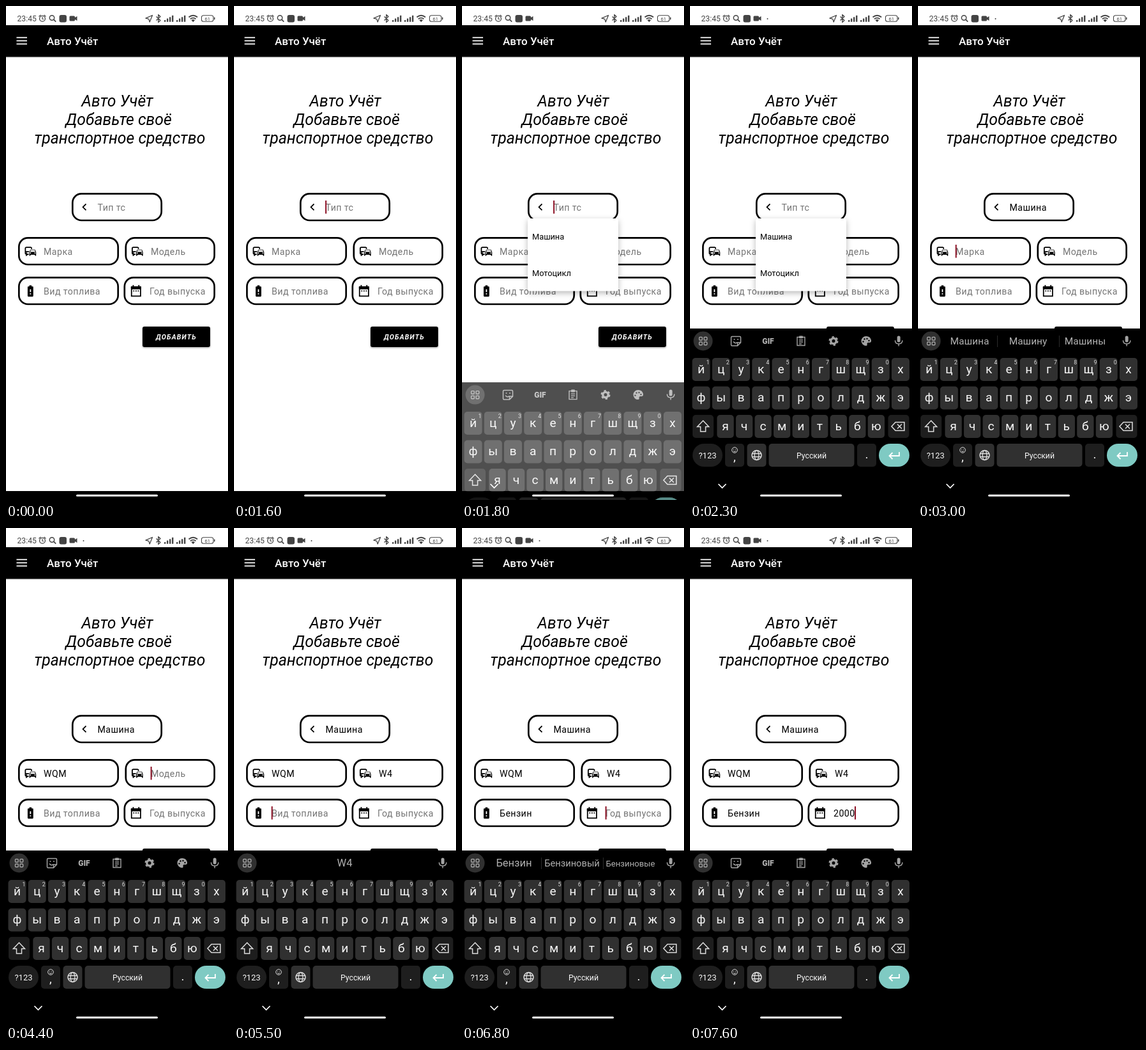
An HTML page for the animation above (8 s loop, 348x772 px).

```html
<!DOCTYPE html>
<html lang="ru">
<head>
<meta charset="utf-8">
<title>Авто Учёт</title>
<style>
html, body { margin: 0; width: 100%; height: 100%; overflow: hidden; background: #fff; }
svg { display: block; width: 348px; height: 772px; font-family: Roboto, sans-serif; }
.line { fill: none; stroke: currentColor; stroke-width: 2; }
.title { font-style: italic; font-size: 24.8px; text-anchor: middle; }
.field { fill: #fff; stroke: #000; stroke-width: 2.7; }
.value, .hint { font-size: 14.2px; letter-spacing: .44px; }
.hint { fill: #757575; }
.popup rect { fill: #fff; filter: drop-shadow(0 3px 5px rgba(0,0,0,.28)); }
.popup text { font-size: 12.8px; }
.cursor { fill: #8c1024; }
.key { fill: #303030; }
.dark { fill: #1e1e1e; }
.letter { font-size: 19.2px; fill: #f6f6f6; text-anchor: middle; }
.digit { font-size: 8.8px; fill: #ddd; text-anchor: middle; }
.tools { color: #a3a3a3; }
.tools text { fill: #b0b0b0; text-anchor: middle; }
</style>
</head>
<body>
<svg id="stage" viewBox="0 0 348 772"></svg>
<script>
const LOOP = 8000, STEP = 100;

const rect = (x, y, w, h, r, attrs = '') =>
  `<rect x="${x}" y="${y}" width="${w}" height="${h}" rx="${r}" ${attrs}/>`;
const text = (x, y, s, attrs = '') => `<text x="${x}" y="${y}" ${attrs}>${s}</text>`;
const line = (d, attrs = '') => `<path class="line" d="${d}" ${attrs}/>`;
const circle = (x, y, r, attrs = '') => `<circle cx="${x}" cy="${y}" r="${r}" ${attrs}/>`;
const icon = (x, y, body) => `<g transform="translate(${x - 10.6} ${y - 10.6}) scale(.886)">${body}</g>`;
// Shown only inside the given "from-to" spans (ms).
const during = (spans, body) => `<g data-on="${spans}">${body}</g>`;

const icons = {
  back: line('M15.5 6.5L10 12l5.5 5.5', 'stroke-width="2.2"'),
  car: line('M14 8V7a2 2 0 0 0-2-2H5a2 2 0 0 0-2 2v8a2 2 0 0 0 2 2h4M3 12.5h6.5M4 20l2.8-2.6') + circle(5, 15, 1.1) +
    '<path fill-rule="evenodd" d="M10 13.8l1.4-4.1q.3-.7 1-.7h7.2q.7 0 1 .7l1.4 4.1v5.5q0 .7-.7.7h-.6q-.7 0-.7-.8V18h-8v1.2q0 .8-.7.8h-.6q-.7 0-.7-.7zM12.4 10l-1 3h9.2l-1-3z"/>' +
    circle(12, 15, 1, 'fill="#fff"') + circle(20, 15, 1, 'fill="#fff"'),
  fuel: rect(7, 4, 10, 18, 1.3) + rect(10, 2, 4, 3, 0) +
    rect(11, 9, 2, 5, 0, 'fill="#fff"') + rect(11, 16, 2, 2, 0, 'fill="#fff"'),
  year: line('M4 5h16v16H4z') + rect(3, 4, 18, 5, 1) + rect(6, 1.5, 2, 4, 0) + rect(16, 1.5, 2, 4, 0) +
    [7, 11, 15].map(x => rect(x, 11, 2, 2, 0)).join('')
};

const fields = [
  { x: 103, y: 293, w: 142, tx: 143.5, icon: 'back', hint: 'Тип тс', value: 'Машина', end: 203, at: 2600, cursor: ['1600-2100', '2600-3000'],
    popup: { y: 332, from: 1600, to: 2500, items: ['Машина', 'Мотоцикл'] } },
  { x: 19, y: 362, w: 158, tx: 59, icon: 'car', hint: 'Марка', value: 'WQM', end: 95, at: 3900, cursor: ['3000-3400', '3900-4400'],
    popup: { y: 73, from: 3000, to: 3800, items: ['WQM', 'NERUMA', 'VELDU', 'ORVE', 'MEZU'] } },
  { x: 186.5, y: 362, w: 141.5, tx: 227, icon: 'car', hint: 'Модель', value: 'W4', end: 249, at: 5100, cursor: ['4400-4800', '5100-5500'],
    popup: { y: 242, from: 4400, to: 5000, items: ['W4', 'W7'] } },
  { x: 19, y: 424, w: 158, tx: 59, icon: 'fuel', hint: 'Вид топлива', value: 'Бензин', end: 111, at: 6300, cursor: ['5500-6000', '6300-6800'],
    popup: { y: 134, from: 5500, to: 6200, items: ['Бензин', 'Дизель', 'Газ', 'Электро', 'Гибрид'] } },
  { x: 184.5, y: 424, w: 143.5, tx: 225, icon: 'year', hint: 'Год выпуска', value: '2000', end: 259, at: 7500, cursor: ['6800-7200', '7500-8000'],
    popup: { y: 247, from: 6800, to: 7400, items: ['2000', '2001', '2002'] } }
];

function drawField(f) {
  const mid = f.y + 21.3;
  const cursor = (x, spans) => during(spans, rect(x, mid - 10.3, 2, 20.5, 0, 'class="cursor"'));
  return rect(f.x + 1.3, f.y + .4, f.w - 2.6, 41.6, 14, 'class="field"') +
    icon(f.x + 19.3, mid, icons[f.icon]) +
    during(`0-${f.at}`, text(f.tx, mid + 5.5, f.hint, 'class="hint"')) +
    during(`${f.at}-${LOOP}`, text(f.tx, mid + 5.5, f.value, 'class="value"')) +
    cursor(f.tx - .4, f.cursor[0]) + cursor(f.end - 1, f.cursor[1]);
}

function drawPopup({ x, w, popup: p }) {
  const row = 56.7;
  return `<g class="popup" data-from="${p.from}" data-to="${p.to}">` +
    rect(x, p.y, w, row * p.items.length, 3) +
    p.items.map((s, i) => text(x + 7, p.y + row * (i + .5) + 4.5, s)).join('') + '</g>';
}

function drawStatus() {
  const bars = x => [0, 1, 2, 3].map(i => rect(x + i * 4, 22 - i * 2.4, 2.4, 2.7 + i * 2.4, .5)).join('');
  return '<g fill="#444" color="#444" stroke-linejoin="round">' +
    text(17.5, 24, '23:45', 'font-size="12.2"') +
    circle(57, 19.8, 4.4, 'class="line" style="stroke-width:1.3"') +
    line('M57 17v3l2 1M51.5 16.5l3-2.5M62.5 16.5l-3-2.5', 'style="stroke-width:1.2"') +
    circle(72, 18.5, 3.7, 'class="line" style="stroke-width:1.5"') + line('M74.7 21.2l3.5 3.5', 'style="stroke-width:1.7"') +
    rect(83.5, 14, 11.5, 11.5, 3) + rect(99.5, 15.5, 8.5, 8, 1.5) + '<path d="M108 18l3.5-2v7l-3.5-2z"/>' +
    during(`2200-${LOOP}`, circle(121.5, 20, 1)) +
    line('M229.5 14.5l-10.5 4.7 4.8 1.2 1.4 4.6z', 'style="stroke-width:1.3"') +
    line('M235.5 16.5l6.5 6-3.2 3V13.5l3.2 3-6.5 6', 'style="stroke-width:1.3"') +
    bars(248) + bars(267) +
    line('M286.5 17.5q6.8-5.5 13.6 0M289 20.3q4.3-3.4 8.6 0', 'style="stroke-width:1.8"') + '<path d="M290.5 22q2.8-2 5.6 0l-2.8 3.2z"/>' +
    rect(306.5, 14.7, 18.5, 9.6, 3, 'class="line" style="stroke-width:1.1"') + rect(326, 17.5, 1.5, 4, .7) +
    text(315.8, 22.5, '61', 'font-size="7.5" text-anchor="middle"') + '</g>';
}

function drawTools() {
  const y = 523.5, tint = 'fill="#a3a3a3"';
  const strip = [
    line(`M66 ${y - 7}h12q1.5 0 1.5 1.5v8l-5 5h-8.5q-1.5 0-1.5-1.5v-11.5q0-1.5 1.5-1.5zM79 ${y + 2.5}h-4.5v4.5M68 ${y + 1}q3 4 6 1`, 'style="stroke-width:1.5"') +
      circle(69.5, y - 2.5, 1, tint) + circle(75, y - 2.5, 1, tint),
    text(122.5, y + 4, 'GIF', 'font-size="12" font-weight="900"'),
    line(`M168 ${y - 6}h12v13h-12zM171 ${y - 1.5}h6M171 ${y + 1.5}h6M171 ${y + 4.5}h4`, 'style="stroke-width:1.4"') + rect(171, y - 8, 6, 4, 1, tint),
    circle(225, y, 4.2, 'class="line" style="stroke-width:3.4"') + circle(225, y, 6.3, 'class="line" style="stroke-width:2.4" stroke-dasharray="3.3 3.3"'),
    `<path ${tint} d="M276 ${y - 7.5}a7.5 7.5 0 1 0 0 15q2.5-.5 1.5-3 0-2 2-2h2.5q2.5-.5 2-4-1.5-6-8-6z"/>` +
      [[271.5, 1], [273.5, -3], [277.5, -3.5], [280.5, -.5]].map(([x, d]) => circle(x, y + d, 1.2)).join('')
  ].join('');
  const words = (spans, list) => during(spans, list.map(([x, s, size]) => text(x, y + 5.5, s, `font-size="${size}"`)).join('') +
    (list.length > 1 ? line('M124.5 515v18M221.5 515v18', 'style="stroke-width:1;stroke:#2a2a2a"') : ''));
  return '<g class="tools">' + circle(20.5, y, 15, 'fill="#303030"') +
    [14.5, 22].map(x => [-6, 1.5].map(d => rect(x, y + d, 4.7, 4.7, 1, 'class="line" style="stroke-width:1.4"')).join('')).join('') +
    during(`0-2700,3100-5100,5600-6400,6900-${LOOP}`, strip) +
    words('2700-3100', [[81, 'Машина', 15.5], [172.5, 'Машину', 15.5], [262, 'Машины', 15.5]]) +
    words('5100-5600', [[173.5, 'W4', 16.5]]) +
    words('6400-6900', [[81.5, 'Бензин', 16.5], [172.5, 'Бензиновый', 14.7], [264, 'Бензиновые', 13.2]]) +
    rect(324.7, y - 8, 5, 10, 2.5, tint) + line(`M321.5 ${y - 1}q0 5.5 5.7 5.5t5.7-5.5M327.2 ${y + 4}v4`, 'style="stroke-width:1.5"') + '</g>';
}

function drawKeyboard() {
  const key = (x, y, w, cls = 'key', r = 5) => rect(x - w / 2, y - 18, w, 36, r, `class="${cls}"`);
  const row = (letters, x0, pitch, y) => [...letters].map((c, i) =>
    key(x0 + i * pitch, y, pitch - 3.2) + text(x0 + i * pitch, y + 5.5, c, 'class="letter"')).join('');
  const digits = [...'1234567890'].map((d, i) => text(28 + i * 31.25, 560, d, 'class="digit"')).join('');
  const thin = 'style="stroke-width:1.5"';
  return rect(0, 504, 348, 268, 0) + drawTools() +
    row('йцукенгшщзх', 17.5, 31.25, 568) + digits + row('фывапролджэ', 17.5, 31.25, 612.5) + row('ячсмитьбю', 55.5, 29.55, 657) +
    '<g color="#ddd">' + key(20.5, 657, 33, 'dark') + line('M20.5 648l9 9.5h-5v7.5h-8v-7.5h-5z', thin) +
    key(327, 657, 33, 'dark') + line('M322 650.5h14v13h-14l-6-6.5zM325 653.5l7 7M332 653.5l-7 7', thin) +
    key(27.5, 702, 47, 'dark', 18) + text(27.5, 707, '?123', 'class="letter" style="font-size:13px"') +
    key(70, 702, 30, 'dark') + text(70, 711, ',', 'class="letter"') +
    circle(70, 694, 4.3, 'class="line" style="stroke-width:1"') + line('M68 695.5q2 2 4 0M68.5 692.5v1M71.5 692.5v1', 'style="stroke-width:1"') +
    key(104.5, 702, 30) + circle(104.5, 702, 7.5, `class="line" ${thin}`) +
    '<ellipse cx="104.5" cy="702" rx="3.4" ry="7.5" class="line" style="stroke-width:1.3"/>' + line('M97.5 699.5h14M97.5 704.5h14', 'style="stroke-width:1.3"') +
    key(190.5, 702, 134) + text(190.5, 706.5, 'Русский', 'class="letter" style="font-size:12.2px"') +
    key(277, 702, 30, 'dark') + text(277, 707, '.', 'class="letter"') +
    rect(296, 684, 48, 36, 18, 'fill="#7fcac3"') + line('M328 697v6h-15M317.5 698l-5 5 5 5', 'style="stroke-width:1.8;stroke:#fff"') + '</g>';
}

const stage = document.getElementById('stage');
stage.innerHTML = rect(0, 0, 348, 772, 0, 'fill="#fff"') + drawStatus() +
  rect(0, 79, 348, 1.5, 0, 'fill="#ccc"') + rect(0, 30, 348, 49.5, 0) +
  line('M16.5 49.3h16.5M16.5 54.3h16.5M16.5 59.3h16.5', 'style="stroke:#fff;stroke-width:1.8"') +
  text(64, 61.2, 'Авто Учёт', 'fill="#fff" font-size="17" font-weight="500"') +
  ['Авто Учёт', 'Добавьте своё', 'транспортное средство'].map((s, i) => text(174.5 + i * 2, 157 + i * 29, s, 'class="title"')).join('') +
  fields.map(drawField).join('') +
  rect(214, 501, 106, 32, 3, 'style="filter:drop-shadow(0 1px 1.5px rgba(0,0,0,.4))"') +
  text(267, 521.3, 'ДОБАВИТЬ', 'fill="#fff" font-size="10.7" font-weight="600" font-style="italic" letter-spacing="1.1" text-anchor="middle"') +
  fields.map(drawPopup).join('') +
  rect(0, 758, 348, 14, 0) + `<g id="keyboard">${drawKeyboard()}</g>` +
  during(`1800-${LOOP}`, line('M44.5 747l6 6 6-6', 'style="stroke:#fff;stroke-width:1.7"')) +
  rect(110, 763.5, 128, 3, 1.5, 'fill="#fff"');

const clamp = v => Math.min(1, Math.max(0, v));
const keyboard = document.getElementById('keyboard');
const popups = [...stage.querySelectorAll('.popup')];
const timed = [...stage.querySelectorAll('[data-on]')].map(el =>
  ({ el, spans: el.dataset.on.split(',').map(s => s.split('-').map(Number)) }));

function render(t) {
  for (const { el, spans } of timed)
    el.style.display = spans.some(([a, b]) => t >= a && t < b) ? '' : 'none';
  for (const el of popups) {
    const { from, to } = el.dataset;
    const alpha = Math.min(clamp((t - from) / 200), clamp(1 - (t - to) / 200));
    el.style.opacity = alpha;
    el.style.display = alpha ? '' : 'none';
  }
  // The keyboard fades in as it slides up, both on the same ease-out.
  const rise = 1 - (1 - clamp((t - 1700) / 312)) ** 3;
  keyboard.style.opacity = rise;
  keyboard.setAttribute('transform', `translate(0 ${268 * (1 - rise)})`);
}

let start;
function tick(now) {
  start ??= now;
  render(Math.floor(((now - start) % LOOP) / STEP) * STEP);
  requestAnimationFrame(tick);
}
render(0);
requestAnimationFrame(tick);
</script>
</body>
</html>
```
